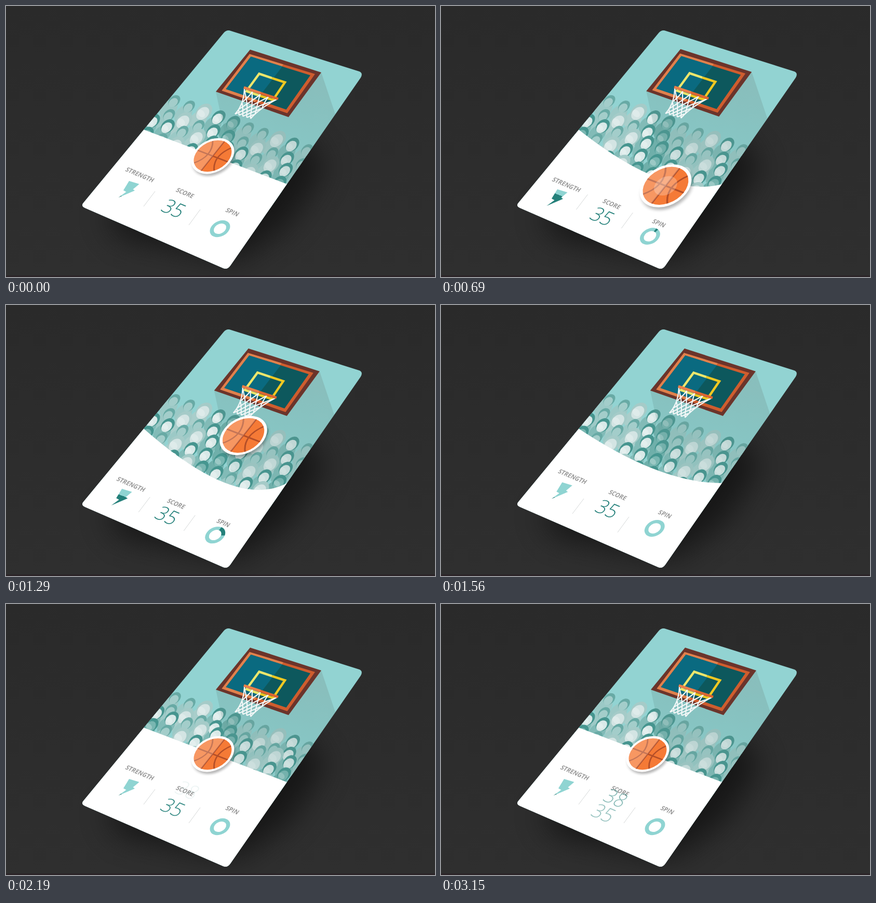
An HTML page for the animation above (3.18 s loop, 826x522 px).

```html
<!DOCTYPE html>
<html lang="en">
<head>
<meta charset="utf-8">
<title>Basketball card</title>
<style>
html, body { margin: 0; width: 100%; height: 100%; overflow: hidden; background: #2c2c2c; }
svg { display: block; width: 826px; height: 522px; }
text { font-family: "Open Sans", "Noto Sans", sans-serif; text-anchor: middle; }
.label { font-size: 11px; font-weight: 700; fill: #999; }
.num { font-size: 35px; font-weight: 300; fill: #24807a; }
.seam { fill: none; stroke: #b44f28; stroke-width: 7; }
</style>
</head>
<body>
<svg viewBox="0 0 826 522">
  <defs>
    <linearGradient id="room" x2="0" y2="1">
      <stop stop-color="#2a2a2a"/><stop offset="1" stop-color="#2f2f2f"/>
    </linearGradient>
    <linearGradient id="shade" gradientUnits="userSpaceOnUse" x1="520" y1="140" x2="475" y2="335">
      <stop stop-color="#789a96" stop-opacity=".36"/><stop offset="1" stop-color="#4f8f8a" stop-opacity=".1"/>
    </linearGradient>
    <linearGradient id="power" gradientUnits="userSpaceOnUse" x1="228" y1="368" x2="242" y2="332">
      <stop class="level" stop-color="#24807a"/><stop class="level" stop-color="#8fd4d2"/>
    </linearGradient>
    <filter id="soft" x="-50%" y="-50%" width="200%" height="200%"><feGaussianBlur stdDeviation="28"/></filter>
    <filter id="near" x="-50%" y="-50%" width="200%" height="200%"><feGaussianBlur stdDeviation="7"/></filter>
    <path id="shape" d="M419 52Q425 45 433 48L680 126Q688 129 683 138L432 500Q426 508.500 418 505L152 389Q143 385 150 378Z"/>
    <clipPath id="card"><use href="#shape"/></clipPath>
    <clipPath id="disc"><circle r="88"/></clipPath>
  </defs>

  <rect width="826" height="522" fill="url(#room)"/>
  <rect y="519" width="826" height="3" fill="#2b2428"/>
  <path d="M560 240L615 310L545 420L445 492L220 445L190 400Z" opacity=".5" filter="url(#soft)"/>

  <use href="#shape" fill="#92d3d2"/>
  <g clip-path="url(#card)">
    <g id="crowd"></g>
    <g id="board">
      <path d="M404 165L607 128L642 232L600 345L440 335Z" fill="url(#shade)"/>
      <path d="M470 84L607 128L544 214L404 165Z" fill="#6b342b"/>
      <path d="M469 92.500L595 131L541.500 206.500L415.500 163Z" fill="#cf5d2e"/>
      <path d="M469 92.500L534 112.400L479 185L415.500 163Z" fill="#e0814d"/>
      <path d="M471.500 97.500L586 133.500L539.500 199.500L423.500 160Z" fill="#0d585d"/>
      <path d="M471.500 97.500L532 116.500L483 180.300L423.500 160Z" fill="#0a6a80"/>
      <g fill="none" stroke-width="4.500">
        <path d="M512 138.800L537 147L514 181L489 173" stroke="#efc822"/>
        <path d="M512 138.800L487.500 130.500L463 164L489 173" stroke="#ece66c"/>
      </g>
      <g id="net" fill="none" stroke="#f4f8f8" stroke-width="2.200" stroke-linejoin="round"></g>
      <path d="M458 157L524 179" stroke="#dd6632" stroke-width="5"/>
      <path d="M458 157L490 167.700" stroke="#e87f4c" stroke-width="5"/>
    </g>
    <path id="sheet" fill="#fff"/>
  </g>

  <path class="bar" d="M287 357L265 386M374 392L352 422" stroke="#d5d8d8"/>
  <path id="bolt" d="M237 337L256.500 343L244.500 353L248 355.500L216.500 369L231.500 358L226 355Z" fill="url(#power)"/>
  <g id="ring" fill="none" stroke-width="18">
    <circle r="38" stroke="#8fd4d2"/>
    <circle id="spin" r="38" stroke="#24807a" pathLength="100" transform="rotate(-90)"/>
  </g>
  <g id="labels"></g>
  <text class="num" id="low" y="12.500">35</text>
  <text class="num" id="high" y="12.500">38</text>

  <g id="ball">
    <circle cx="14" cy="10" r="98" opacity=".28" filter="url(#near)"/>
    <circle r="100" fill="#fff"/>
    <circle r="88" fill="#f57a36"/>
    <g clip-path="url(#disc)">
      <path class="seam" d="M0 -90V90M-90 0H90M58 -75Q-4 0 62 68M-58 -75Q4 0 -62 68"/>
      <rect x="-100" y="-100" width="100" height="200" fill="#fff" opacity=".22"/>
    </g>
    <circle id="touch" r="45" fill="#fff"/>
  </g>
</svg>
<script>
const LOOP = 3180, PRESS = 150, RELEASE = 1230, RETURN = 1770;
const $ = id => document.getElementById(id);
const clamp = x => Math.min(1, Math.max(0, x));
const ramp = (t, start, span) => clamp((t - start) / span);
const easeOut = x => 1 - (1 - x) ** 2;
const easeInOut = x => x < .5 ? 2 * x * x : 1 - 2 * (1 - x) ** 2;
const mix = (a, b, k) => a + (b - a) * k;

function add(parent, tag, attrs) {
  const el = document.createElementNS("http://www.w3.org/2000/svg", tag);
  for (const k in attrs) el.setAttribute(k, attrs[k]);
  return parent.appendChild(el);
}
const move = (el, x, y) => el.setAttribute("transform", `translate(${x} ${y})`);
// Axes of the tilted card, for text and for round parts
const lay = (el, x, y) => el.setAttribute("transform", `matrix(.92 .39 -.714 .924 ${x} ${y})`);
const tilt = (el, x, y, s) =>
  el.setAttribute("transform", `matrix(${.327 * s} ${.126 * s} ${-.254 * s} ${.32 * s} ${x} ${y})`);

// Spectators: body, hair, face and face size by kind
const kinds = {
  w: ["#82bbb7", "#46958f", "#d9e9e8", 1],
  t: ["#9cc9c6", "#68aaa5", "#a3cdca", .85],
  p: ["#a9cecb", "#a5cbc8", "#d3e4e3", 1.2],
  d: ["#6fafaa", "#469690", "#79b6b1", 1]
};
const rows = [
  [323, 184, "ttpwdttpwt", 3],
  [313, 211, "tptwdtptwtd", 7],
  [282, 222, "wwtpwdwtpwtw", 13],
  [270, 247, "dtpwwdwpwdtp", 13],
  [262, 272, "wtwpdwtwpdwt", 13]
].map(([x, y, people, height], r) => [...people].map((kind, i) => {
  const g = add($("crowd"), "g");
  const [body, hair, face, size] = kinds[kind];
  const part = (dx, dy, rx, ry, fill) => add(g, "ellipse",
    { rx, ry, fill, transform: `translate(${x + 28.4 * i + dx} ${y + 10.5 * i + dy}) rotate(-44)` });
  part(-10, 14, 20, 14, body);
  part(1, -1, 15.5 * size, 11 * size, hair);
  part(-1, 2, 12 * size, 8.5 * size, face);
  if (kind != "t") part(-4, 2, 5 * size, 7 * size, "#ffffff40");
  return { g, height, delay: (4 - r) * 30 + i % 2 * 25 };
})).flat();

// Net: strands that cross more steeply towards the end of a narrowing sleeve
const quad = (a, b, c, k) => mix(mix(a, b, k), mix(b, c, k), k);
function netPoint(s, k) {
  const x = mix(quad(459, 458, 441, k), quad(521, 487, 471, k), s);
  const y = mix(quad(159, 190, 208, k), quad(180, 198, 217, k), s);
  return x.toFixed(1) + " " + y.toFixed(1);
}
function strand(start, slope) {
  const pts = [];
  for (let k = 0; k <= 1.001; k += .05) {
    const s = start + slope * k ** 1.5;
    if (s > -.01 && s < 1.01) pts.push(netPoint(s, k));
  }
  if (pts.length > 1) add($("net"), "path", { d: "M" + pts.join("L") });
}
for (let s = -.75; s < 1; s += .25) { strand(s, .75); strand(1 - s, -.75); }
strand(0, 0);
strand(1, 0);

const labels = [["STRENGTH", 258, 325, 25], ["SCORE", 345, 360, 28], ["SPIN", 436, 397, 28]]
  .map(([word, x, y, drop]) => {
    const el = add($("labels"), "text", { class: "label", y: 4 });
    el.textContent = word;
    return { el, x, y, drop };
  });

function drawBall(t, pull) {
  let x = 398, y = 289, size = 1, alpha = 1;
  if (t < RELEASE) {
    x += 45 * pull;
    y += 75 * pull;
    size += .27 * pull;
  } else if (t < RETURN) {
    const k = ramp(t, RELEASE, 280);
    x = quad(443, 478, 489, k);
    y = quad(364, 60, 172, k);
    size = mix(1.27, .5, k);
    alpha = 1 - ramp(t, 1460, 60);
  } else {
    const k = ramp(t, RETURN, 330) - 1;
    size = Math.max(0, 1 + 2.7 * k ** 3 + 1.7 * k ** 2);
    alpha = ramp(t, RETURN, 80);
  }
  tilt($("ball"), x, y, size);
  $("ball").setAttribute("opacity", alpha);
  $("touch").setAttribute("opacity", t < RELEASE ? .24 * ramp(t, PRESS, 150) : 0);
}

function draw(t) {
  const pull = easeOut(ramp(t, PRESS, 1050));
  const held = span => pull * (1 - easeOut(ramp(t, RELEASE, span)));

  // The board springs back after the throw
  const since = t - RELEASE;
  const sway = since < 0 ? pull :
    since > 540 ? 0 : Math.exp(-.007 * since) * Math.cos(since * Math.PI / 170);
  move($("board"), -11.5 * sway, -1.3 * sway);

  const sag = pull * (1 - easeInOut(ramp(t, RELEASE, 660)));
  $("sheet").setAttribute("d",
    `M265 238Q${403 + 41 * sag} ${290.5 + 107 * sag} 541 343L600 522H100V238Z`);

  const slow = held(620), mid = held(520), quick = held(440);
  for (const l of labels) lay(l.el, l.x - 21 * slow, l.y + l.drop * slow);
  move($("bolt"), -17 * slow, 21 * slow);
  tilt($("ring"), 412 - 12.5 * quick, 429 + 19 * quick, 1);
  const lag = ramp(t, PRESS, 1410) * (1 - easeInOut(ramp(t, 1590, 480)));
  move(document.querySelector(".bar"), -12 * lag, 16 * lag);

  const drain = 1 - ramp(t, RELEASE, 180);
  for (const stop of document.querySelectorAll(".level"))
    stop.setAttribute("offset", .78 * pull * drain);
  const turn = 30 * ramp(t, 600, 600) * drain;
  $("spin").setAttribute("stroke-dasharray", `${turn} 200`);
  $("spin").setAttribute("visibility", turn > 0 ? "visible" : "hidden");

  const roll = easeInOut(ramp(t, 2094, 480)) - easeInOut(ramp(t, 2918, 480));
  lay($("low"), 323 - 16 * mid - 19 * roll, 390 + 20 * mid + 24 * roll);
  lay($("high"), 323 + 29 * (1 - roll), 390 - 34 * (1 - roll));
  $("low").setAttribute("opacity", 1 - roll);
  $("high").setAttribute("opacity", roll);

  // Two jumps, front rows first
  for (const { g, height, delay } of rows) {
    const jump = height * Math.sin(2 * Math.PI * ramp(t, 1940 + delay, 900)) ** 2;
    move(g, .7 * jump, -jump);
  }
  drawBall(t, pull);
}

const begin = performance.now();
function tick() {
  draw((performance.now() - begin) % LOOP);
  requestAnimationFrame(tick);
}
tick();
</script>
</body>
</html>
```
